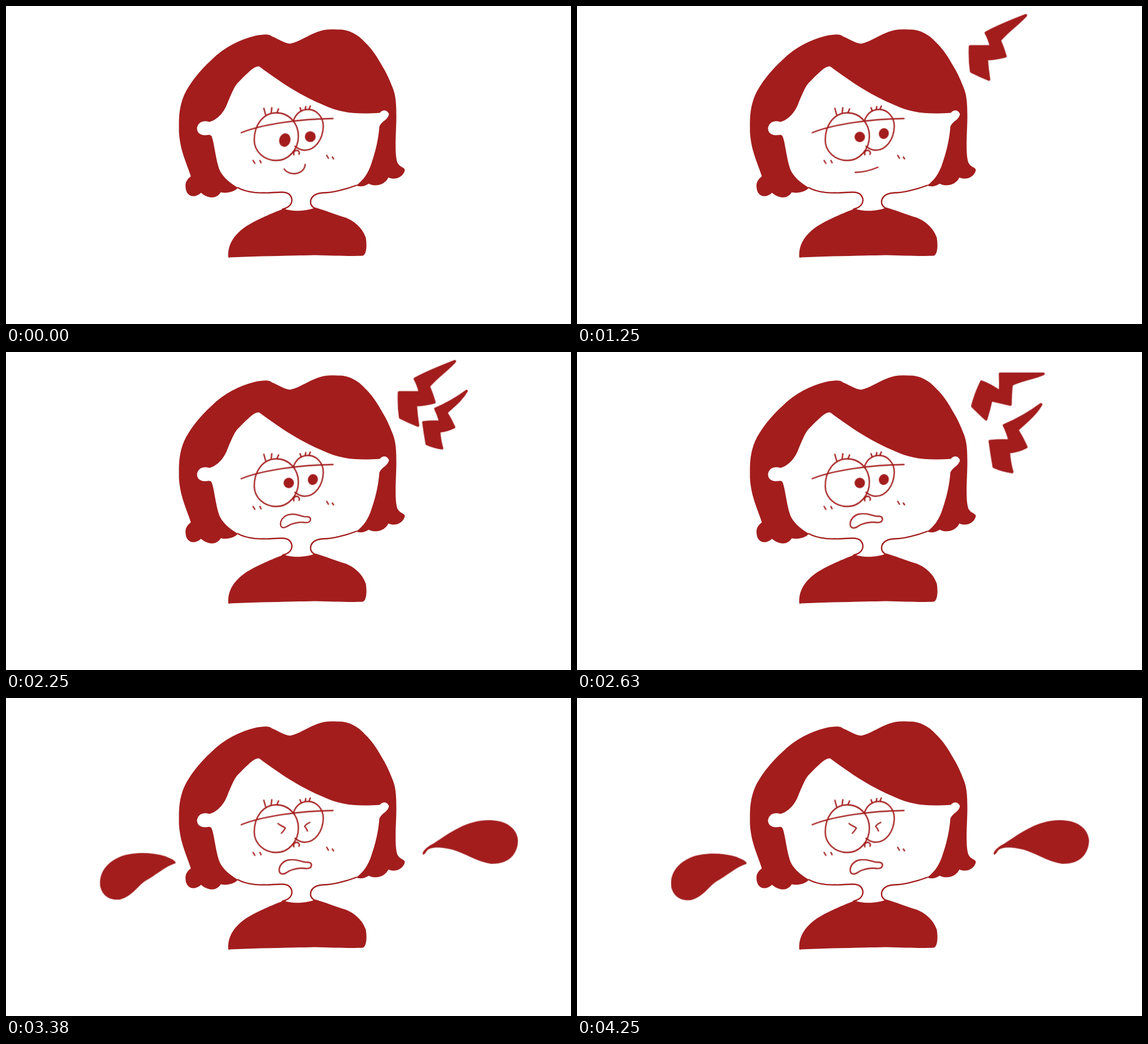
An HTML page that plays this animation: 998x561 px, repeating every 4370 ms.

```html
<!DOCTYPE html>
<html lang="en">
<head>
<meta charset="utf-8">
<title>Mood swing</title>
<style>
html, body { margin: 0; width: 100%; height: 100%; overflow: hidden; background: #fff; }
svg { display: block; width: 100vw; height: 100vh; }
.ink { fill: #a31d1d; }
.line { fill: none; stroke: #a31d1d; stroke-width: 2.4; stroke-linecap: round; stroke-linejoin: round; }
.bolt { fill: #a31d1d; stroke: #a31d1d; stroke-width: 5; stroke-linejoin: round; }
.skin { fill: #fff; }

/* every part switches hard on one shared 4370 ms loop */
.cue { animation: 4370ms step-end infinite; }

.look-down { animation-name: look-down; }
.look-side { animation-name: look-side; }
.squint, .drops { animation-name: upset; }
.smile { animation-name: smile; }
.flat { animation-name: flat; }
.frown { animation-name: frown; }
.mumble { animation-name: mumble; }
.shout { animation-name: shout; }
.bolt-one { animation-name: bolt-one; }
.bolt-two { animation-name: bolt-two; }
.bolt-pair { animation-name: bolt-pair; }
.details { animation-name: boil; }
.drop-left { animation-name: shake-left; }
.drop-right { animation-name: shake-right; }

@keyframes look-down { 0% { opacity: 1 } 20.137%, 100% { opacity: 0 } }
@keyframes look-side { 0% { opacity: 0 } 20.137% { opacity: 1 } 71.625%, 100% { opacity: 0 } }
@keyframes upset { 0% { opacity: 0 } 71.625%, 100% { opacity: 1 } }

@keyframes smile { 0% { opacity: 1 } 22.883%, 100% { opacity: 0 } }
@keyframes flat { 0% { opacity: 0 } 22.883% { opacity: 1 } 31.579%, 100% { opacity: 0 } }
@keyframes frown { 0% { opacity: 0 } 31.579% { opacity: 1 } 51.487%, 100% { opacity: 0 } }
@keyframes mumble { 0% { opacity: 0 } 51.487% { opacity: 1 } 60.183%, 100% { opacity: 0 } }
@keyframes shout { 0% { opacity: 0 } 60.183%, 100% { opacity: 1 } }

@keyframes bolt-one {
  0%, 43.021%, 60.183%, 71.625%, 100% { opacity: 0 }
  25.858%, 51.487%, 65.904% { opacity: 1 }
}
@keyframes bolt-two {
  0%, 43.021%, 60.183%, 71.625%, 100% { opacity: 0 }
  34.325%, 51.487%, 65.904% { opacity: 1 }
}
@keyframes bolt-pair {
  0%, 51.487%, 65.904%, 100% { opacity: 0 }
  43.021%, 60.183% { opacity: 1 }
}

/* slight wobble of the drawn lines */
@keyframes boil {
  0%, 8.696%, 17.162%, 28.604%, 100% { transform: none }
  2.975%, 11.442% { transform: translate(.3px, .5px) }
  5.721%, 14.416%, 22.883% { transform: translate(-.3px, .3px) }
}
@keyframes shake-left {
  0%, 77.346%, 85.812%, 91.533% { transform: none }
  71.625%, 80.092%, 88.787% { transform: translate(-1px, 1px) }
  74.371%, 83.066%, 94.508% { transform: translate(-2px, 1px) }
  97.254%, 100% { transform: translate(0, 1px) }
}
@keyframes shake-right {
  0%, 77.346%, 85.812%, 91.533%, 97.254%, 100% { transform: none }
  71.625%, 80.092%, 88.787% { transform: translate(-1px, .5px) }
  74.371%, 83.066%, 94.508% { transform: translate(-1px, 1px) }
}
</style>
</head>
<body>
<svg viewBox="-.5 -.5 998 561">
  <defs>
    <path id="zigzag" d="M819 92C800 106 778 119 754 129Q760 141 764 156Q746 155 729 157Q732 180 736 202Q752 209 768 211Q763 194 762 176Q780 174 793 167Q786 151 777 137C792 123 809 110 819 92Z"/>
    <path id="mouth" d="M482 302C483 293 491 286 500 285C510 283 517 287 527 289C533 289 539 289 539 294C539 300 533 301 527 300C517 299 509 301 501 304C495 307 493 310 488 310C484 310 482 307 482 302Z"/>
  </defs>

  <!-- hair -->
  <path class="ink" d="M501 66C490 65 478 56 469 53C464 48 452 50 440 52C413 58 384 73 362 95C342 113 323 137 314 157C304 181 305 200 305 222C307 255 318 275 326 300C316 308 316 314 317 322C319 335 332 340 344 329C354 338 370 342 379 328C389 331 404 327 409 320L618 316C624 319 633 318 640 313C655 320 670 313 675 302C688 308 702 300 704 289C704 284 696 285 691 276C685 260 689 220 689 195C689 172 688 158 683 145C677 130 672 118 665 107C655 89 645 74 634 64C620 48 603 40 584 41C570 40 560 41 550 45C533 51 517 63 501 66Z"/>

  <!-- face and neck -->
  <path class="skin" d="M448 107C490 138 520 157 560 174C590 188 617 191 660 188C663 183 672 181 676 190C674 201 663 202 659 212C657 240 650 262 645 277C640 293 631 307 618 316C600 323 575 329 560 329C540 330 536 341 538 349L546 357C530 362 505 363 490 358C507 352 507 338 500 331C490 325 470 330 455 329C438 330 420 326 409 320C391 309 381 299 376 287C369 266 368 244 363 230Q361 226 356 227C346 229 336 225 337 214C340 203 349 201 359 204C374 200 386 185 391 170C397 156 402 143 408 136C420 124 433 110 441 107Q446 105 448 107Z"/>
  <path class="line" d="M409 320C420 326 438 330 455 329C470 330 490 325 499 331C507 338 507 350 494 356L488 358M618 316C600 323 575 329 560 329C540 330 536 341 538 349Q540 354 546 357"/>

  <!-- shirt -->
  <path class="ink" d="M490 357C472 364 440 377 421 390C402 404 391 420 392 442Q393 445 395 443C440 441 500 440 545 439C580 440 610 441 630 440C637 437 637 420 635 408C628 389 614 379 600 373C580 367 560 359 546 355C535 360 510 364 490 357Z"/>

  <g class="cue details">
    <g class="line">
      <path d="M477 188C501 188 516 208 516 229C516 252 499 272 477 272C454 272 438 255 438 236C438 210 453 188 477 188Z"/>
      <path d="M507 203C511 189 521 182 533 182C549 182 560 196 560 212C559 236 545 254 527 254C520 254 515 251 510 247"/>
      <path d="M415 223C455 207 520 199 577 198"/>
      <path d="M455 180L458 191M469 179L468 187M481 181L478 188M519 179L521 185M529 177L528 182M537 176L535 181"/>
      <path d="M508 262C506 257 510 254 513 254C517 255 519 258 517 261"/>
      <path d="M436 272L439 277M448 272L450 276M566 263L569 268M576 266L578 269"/>
    </g>
  </g>

  <g class="cue look-down ink">
    <ellipse cx="492" cy="236" rx="10" ry="12" transform="rotate(15 492 236)"/>
    <circle cx="537" cy="230" r="9.6"/>
  </g>
  <g class="cue look-side ink">
    <circle cx="499" cy="230.5" r="9.2"/>
    <ellipse cx="541.5" cy="224.5" rx="8.8" ry="9.6" transform="rotate(20 541.5 224.5)"/>
  </g>
  <path class="cue squint line" d="M480 221C484 225 490 226 493 229Q490 234 486 238M536 219C532 221 528 224 527 226Q530 229 532 234"/>

  <path class="cue smile line" d="M491 287C498 299 526 299 528 279"/>
  <path class="cue flat line" d="M491 293C505 293 519 289 531 284"/>
  <path class="cue frown line" d="M487 300C497 285 520 281 537 291"/>
  <g class="cue mumble line"><use href="#mouth" transform="translate(36 21) scale(.93)"/></g>
  <use class="cue shout line" href="#mouth"/>

  <path class="cue bolt-one bolt" d="M792 16C778 22 745 34 722 47Q728 58 731 71L694 71Q693 95 696 115Q712 123 727 129Q724 110 723 93Q742 92 756 88Q752 74 746 60C759 44 780 30 792 16Z"/>
  <g class="cue bolt-two bolt"><use href="#zigzag" transform="translate(117 -10) scale(.85)"/></g>
  <g class="cue bolt-pair bolt">
    <path d="M823 38C800 38 775 38 747 38Q748 54 747 70Q731 58 714 52Q704 72 698 95Q711 108 722 118Q727 102 731 84Q748 88 765 92Q765 73 767 57C784 48 809 45 823 38Z"/>
    <use href="#zigzag"/>
  </g>

  <g class="cue drops ink">
    <path class="cue drop-left" d="M299 291C300 286 290 283 282 279C255 271 222 271 200 280C175 291 163 310 166 332C170 350 185 357 201 355C223 349 232 331 246 322C263 313 280 297 299 291Z"/>
    <path class="cue drop-right" d="M736 276C733 270 745 261 755 256C785 236 815 214 855 215C890 216 903 235 904 251C903 275 888 293 856 292C830 288 810 273 788 267C770 263 754 261 745 267C741 270 741 275 736 276Z"/>
  </g>
</svg>
</body>
</html>
```
